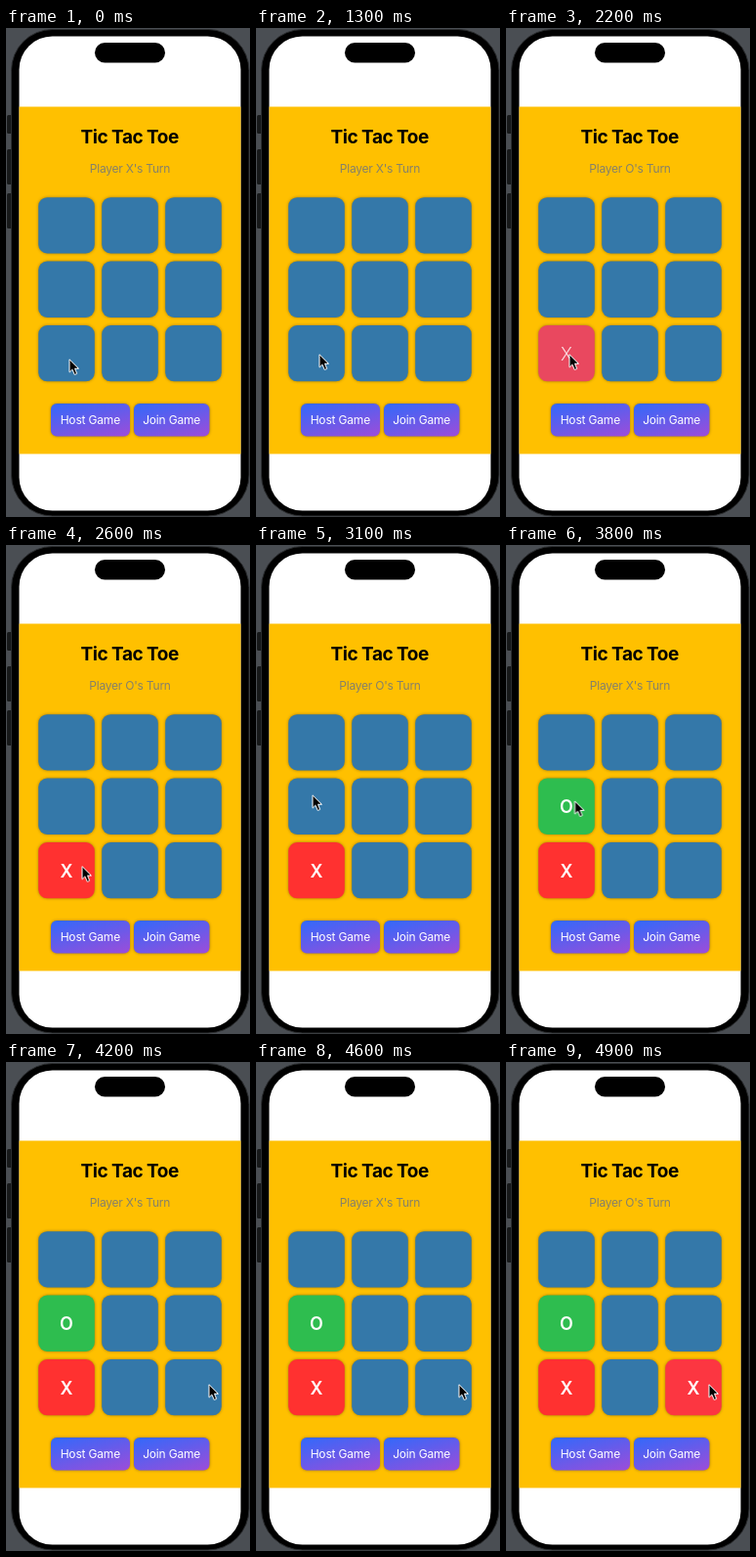
Animation, 250 px wide and 500 px high, one loop 5 s. Source, as an HTML page:

```html
<!DOCTYPE html>
<html lang="en">
<head>
<meta charset="utf-8">
<title>Tic Tac Toe</title>
<style>
  html, body { margin: 0; width: 100%; height: 100%; overflow: hidden; background: #4a4e53; }
  svg { display: block; width: 250px; height: 500px; }
  text { font-family: Inter, "Open Sans", sans-serif; text-anchor: middle; }

  .title { font-size: 19px; font-weight: 700; letter-spacing: -.5px; }
  .turn { font-size: 12px; letter-spacing: -.22px; fill: #85806a; }
  .label { font-size: 12px; letter-spacing: -.18px; fill: #fff; }
  .mark { font-size: 18px; font-weight: 600; fill: #fff; }
  .cell { fill: #3478a9; }
  .shadow { filter: drop-shadow(0 .5px 1.8px rgba(0, 0, 0, .38)); }

  .anim { animation: 5s linear infinite; }
  .turn-x { animation-name: turnX; }
  .turn-o { animation-name: turnO; }
  .c6 { animation-name: fill6; }
  .c3 { animation-name: fill3; }
  .c8 { animation-name: fill8; }
  .m6 { animation-name: mark6; }
  .m3 { animation-name: mark3; }
  .m8 { animation-name: mark8; }
  .cursor { animation-name: move; }

  @keyframes turnX {
    0%, 39.99% { opacity: 1; }
    40%, 67.99% { opacity: 0; }
    68%, 92.99% { opacity: 1; }
    93%, 100% { opacity: 0; }
  }
  @keyframes turnO {
    0%, 39.99% { opacity: 0; }
    40%, 67.99% { opacity: 1; }
    68%, 92.99% { opacity: 0; }
    93%, 100% { opacity: 1; }
  }

  @keyframes fill6 {
    0%, 34% { fill: #3478a9; }
    36%, 41% { fill: #3e7ca1; }
    44% { fill: #e9485f; }
    48%, 100% { fill: #ff3130; }
  }
  @keyframes fill3 {
    0%, 69% { fill: #3478a9; }
    70% { fill: #3c7fa0; }
    75%, 100% { fill: #2ebd4f; }
  }
  @keyframes fill8 {
    0%, 93% { fill: #3478a9; }
    96% { fill: #e9485f; }
    98% { fill: #fc3641; }
    100% { fill: #ff3130; }
  }

  @keyframes mark6 {
    0%, 41% { opacity: 0; font-weight: 300; }
    44% { opacity: .8; font-weight: 350; }
    48%, 100% { opacity: 1; font-weight: 600; }
  }
  @keyframes mark3 {
    0%, 70% { opacity: 0; font-weight: 300; }
    73% { opacity: .8; font-weight: 350; }
    75%, 100% { opacity: 1; font-weight: 600; }
  }
  @keyframes mark8 {
    0%, 93% { opacity: 0; font-weight: 300; }
    96% { opacity: .8; font-weight: 350; }
    98%, 100% { opacity: 1; font-weight: 600; }
  }

  @keyframes move {
    0%, 16% { transform: translate(65px, 338.7px); }
    25%, 50% { transform: translate(65px, 333.7px); }
    52% { transform: translate(78px, 328.7px); }
    56% { transform: translate(72.5px, 296px); }
    62%, 74% { transform: translate(58px, 255.7px); animation-timing-function: ease-in-out; }
    84%, 100% { transform: translate(208px, 329.7px); }
  }
</style>
</head>
<body>
<svg viewBox="0 0 250 500">
  <defs>
    <linearGradient id="violet" x1=".1" y1="-.1" x2=".9" y2="1.1">
      <stop offset="0" stop-color="#2f6afc"/>
      <stop offset="1" stop-color="#9f4cd8"/>
    </linearGradient>
  </defs>

  <!-- phone -->
  <rect width="250" height="500" fill="#4a4e53"/>
  <g fill="#17191a">
    <rect x="1" y="89" width="6" height="19" rx="1.5"/>
    <rect x="1" y="124" width="6" height="36" rx="1.5"/>
    <rect x="1" y="169" width="6" height="36" rx="1.5"/>
  </g>
  <rect x="5.5" y="1.5" width="243.5" height="497.5" rx="42" stroke="#2b2d2f"/>
  <rect x="13.5" y="8.5" width="227" height="485" rx="34" fill="#fff"/>
  <rect x="91" y="15" width="72" height="20.5" rx="10.25"/>

  <!-- app -->
  <rect x="13.5" y="80.5" width="227" height="355" fill="#ffc000"/>
  <text class="title" x="126.7" y="117.5">Tic Tac Toe</text>
  <text class="turn anim turn-x" x="127" y="147.5">Player X's Turn</text>
  <text class="turn anim turn-o" x="127" y="147.5">Player O's Turn</text>

  <g id="board" class="shadow"></g>
  <text class="mark anim m6" x="62" y="339.5">X</text>
  <text class="mark anim m3" x="62" y="274">O</text>
  <text class="mark anim m8" x="192" y="339.5">X</text>

  <g class="shadow" fill="url(#violet)">
    <rect x="46" y="384" width="81" height="33.5" rx="6"/>
    <rect x="131" y="384" width="77.5" height="33.5" rx="6"/>
  </g>
  <text class="label" x="86.3" y="405">Host Game</text>
  <text class="label" x="169.7" y="405">Join Game</text>

  <path class="anim cursor" d="M0 0V13.2L3 10.4L5.2 15.6L7.7 14.6L5.5 9.5H9.5Z"
        stroke="#fff" stroke-linejoin="round"/>
</svg>
<script>
  const board = document.getElementById("board");
  for (let i = 0; i < 9; i++) {
    const cell = document.createElementNS(board.namespaceURI, "rect");
    const attrs = {
      class: `cell anim c${i}`,
      x: 33.2 + 65 * (i % 3),
      y: 173.2 + 65.4 * Math.floor(i / 3),
      width: 57.6, height: 57.3, rx: 9
    };
    for (const key in attrs) cell.setAttribute(key, attrs[key]);
    board.append(cell);
  }
</script>
</body>
</html>
```
